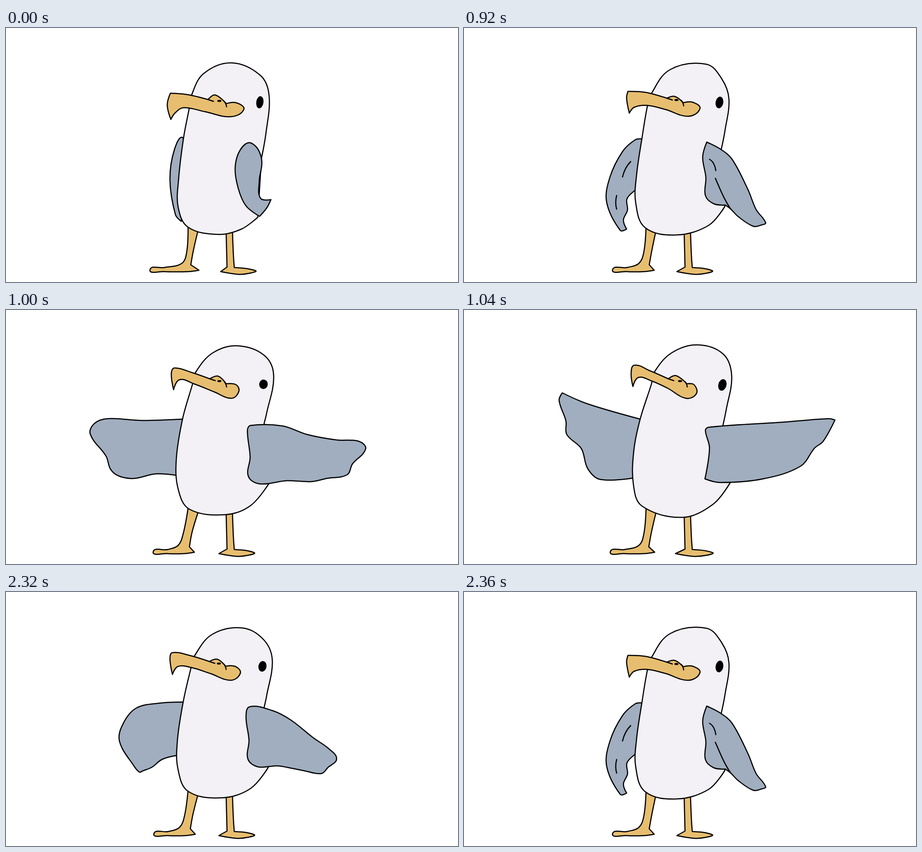
Recreate the animation shown at these times as an HTML page. Size 998 by 561 pixels, loop 2.4 s.

```html
<!DOCTYPE html>
<html lang="en">
<head>
<meta charset="utf-8">
<title>Seagull</title>
<style>
  html, body { margin: 0; height: 100%; overflow: hidden; background: #fff; }
  svg { display: block; width: 100vw; height: 100vh; }
  path { stroke: #000; stroke-width: 2.5; stroke-linecap: round; stroke-linejoin: round; fill: none; }
  .wing { fill: #a0aebf; }
  .body { fill: #f3f1f6; }
  .skin { fill: #e7be70; }

  g { visibility: hidden; animation: 2.4s step-end infinite; }
  #rest { animation-name: rest; }
  #lift { animation-name: lift; }
  #half { animation-name: half; }
  #wide { animation-name: wide; }
  #high { animation-name: high; }
  @keyframes rest { 0% { visibility: visible } 38.333%, 100% { visibility: hidden } }
  @keyframes lift { 0%, 40%, 100% { visibility: hidden } 38.333%, 98.333% { visibility: visible } }
  @keyframes half { 0%, 41.666%, 98.333%, 100% { visibility: hidden } 40%, 96.666% { visibility: visible } }
  @keyframes wide { 0%, 43.333%, 96.666%, 100% { visibility: hidden } 41.666%, 95% { visibility: visible } }
  @keyframes high { 0%, 95%, 100% { visibility: hidden } 43.333% { visibility: visible } }
</style>
</head>
<body>
<svg viewBox="0 0 998 561" preserveAspectRatio="none"></svg>
<script>
const svg = document.querySelector('svg');

// "x y" pairs; a trailing ! marks a sharp corner
const parse = text => text.split(',').map(s => {
  const [x, y] = s.trim().split(' ').map(parseFloat);
  return { x, y, sharp: s.endsWith('!') };
});

// Smooth curve whose handles follow the line between the neighbours
function curve(pts, closed = true) {
  const n = pts.length, at = i => pts[(i + n) % n];
  const handle = (i, reach) => {
    const p = at(i), a = at(i - 1), b = at(i + 1);
    const end = !closed && (i === 0 || i === n - 1);
    const k = p.sharp || end ? 0 : reach / Math.hypot(b.x - a.x, b.y - a.y);
    return `${p.x + (b.x - a.x) * k} ${p.y + (b.y - a.y) * k}`;
  };
  let d = `M${pts[0].x} ${pts[0].y}`;
  for (let i = 0; i < (closed ? n : n - 1); i++) {
    const p = at(i), q = at(i + 1);
    const reach = Math.hypot(q.x - p.x, q.y - p.y) * 0.35;
    d += `C${handle(i, reach)} ${handle(i + 1, -reach)} ${q.x} ${q.y}`;
  }
  return closed ? d + 'Z' : d;
}

const path = (d, cls = '') => `<path class="${cls}" d="${d}"/>`;
const shape = (pts, cls) => path(curve(pts), cls);
const limb = text => path(curve(parse(text), false), 'skin');

function legs({ toe, knee, ankle, heel, toe2, heel2 }) {
  return limb(`402 438,${knee + 7} 495,${knee - 4} 520,${toe + 32} 529,${toe} 534,${toe + 30} 538,
    ${heel - 22} 538,${heel} 535!,${ankle} 523!,${ankle + 6} 490,424 447`) +
    limb(`486 448,488 528!,${toe2} 538!,${toe2 + 38} 544,${heel2 - 15} 542,${heel2} 536,504 529!,502 500,500 448`);
}

function beak(pts) {
  const a = pts[2], b = pts[4];
  return shape(pts, 'skin') +
    path(`M${a.x} ${a.y}l12 4M${b.x - 4} ${b.y - 5}q4 5 5 12`) +
    `<ellipse cx="${b.x - 15}" cy="${b.y - 6}" rx="4.5" ry="2.3"/>`;
}

const eye = ({ x, y, rx, ry, tilt }) =>
  `<ellipse cx="${x}" cy="${y}" rx="${rx}" ry="${ry}" transform="rotate(${tilt} ${x} ${y})"/>`;

function show(id, pose, extra = '') {
  svg.innerHTML += `<g id="${id}">` + shape(pose.far, 'wing') + legs(pose.feet) + shape(pose.body, 'body') +
    shape(pose.near, 'wing') + beak(pose.beak) + eye(pose.eye) + extra + '</g>';
}

function mix(a, b) {
  if (typeof a === 'number') return (a + b) / 2;
  if (typeof a === 'boolean') return a && b;
  const out = Array.isArray(a) ? [] : {};
  for (const k in a) out[k] = mix(a[k], b[k]);
  return out;
}

const rest = {
  body: parse('409 150,436 101,498 77,562 105,581 150,574 232,564 288!,556 418!,520 444,470 456,402 440,380 395,381 335,392 243,405 175'),
  far: parse('391 243,372 268,362 335,374 412,387 427!,400 300!'),
  near: parse('564 288,541 254,518 268,506 308,513 355,530 393,560 416!,576 397,585 379!,562 376,559 340'),
  beak: parse('363 144!,400 147,446 158!,462 148,486 167!,508 165,525 180,495 196,440 185,392 176,373 188,364 202!,356 170'),
  feet: { toe: 318, knee: 392, ankle: 408, heel: 426, toe2: 474, heel2: 551 },
  eye: { x: 560.5, y: 164, rx: 8, ry: 13.5, tilt: 8 }
};
show('rest', rest);

const lift = {
  body: parse('413 146,455 92,535 80,569 112,585 157,576 228,568 268!,576 394!,540 436,470 457,400 441,379 385,381 325,393 243,405 172'),
  far: parse('393 245!,378 247,350 273,322 330,315 385,345 447,359 444!,352 424,361 402,360 377,380 357!,395 300!'),
  near: parse('536 252!,567 268,592 290,627 357,645 401,666 430,657 435,639 438,606 417,589 400,577 391!,551 388,533 370,534 330,527 285'),
  beak: parse('362 140!,400 142,448 155!,465 151,484 165!,505 164,521 178,495 195,445 180,405 171,376 175,365 188!,359 155'),
  feet: { toe: 328, knee: 390, ankle: 409, heel: 420, toe2: 470, heel2: 548 },
  eye: { x: 564, y: 164.5, rx: 8.5, ry: 13, tilt: 10 }
};
const creases = path('M555 332C565 355 575 380 589 400M542 290q11 6 14 25M368 295q-13 13 -18 34M337 370q-4 16 0 30');
show('lift', lift, creases);

const wide = {
  body: parse('419 137,456 95,510 79,570 100,591 145,575 230,570 250!,582 381!,540 432,485 452,405 440,380 395,376 330,390 240,412 163'),
  far: parse('389 241!,300 244,225 240,196 250,186 274,221 323,231 352,250 367,283 372,330 362,375 365!,395 300!'),
  near: parse('540 255,610 256,665 275,730 287,779 290,794 307,765 340,753 364,708 372,675 379,620 377,560 384,535 367,539 325,533 266'),
  beak: parse('372 128,410 138,450 152!,468 146,486 163!,508 165,514 180,498 195,460 181,415 163,383 154,370 176!,365 140'),
  feet: { toe: 325, knee: 384, ankle: 405, heel: 416, toe2: 470, heel2: 548 },
  eye: { x: 568.5, y: 164, rx: 9.5, ry: 10.5, tilt: 10 }
};
show('wide', wide);
show('half', mix(lift, wide));

const high = {
  body: parse('421 136,458 95,515 77,572 97,591 145,579 220,571 258!,588 381!,550 429,482 458,393 433,374 385,375 310,389 241,414 163'),
  far: parse('389 241!,272 207,217 183!,210 200,225 245,227 275,259 306,273 350,300 374,374 371!,395 300!'),
  near: parse('540 259,700 248,805 240,819 243!,793 290,774 305,743 345,660 373,565 381,532 373!,542 305,533 266'),
  beak: parse('376 122,410 134,451 152!,468 145,492 163!,508 165,513 185,490 195,450 173,415 157,385 149,373 169!,369 140'),
  feet: { toe: 323, knee: 390, ankle: 408, heel: 421, toe2: 467, heel2: 549 },
  eye: { x: 570.5, y: 165.5, rx: 9, ry: 13, tilt: 15 }
};
show('high', high);
</script>
</body>
</html>
```
